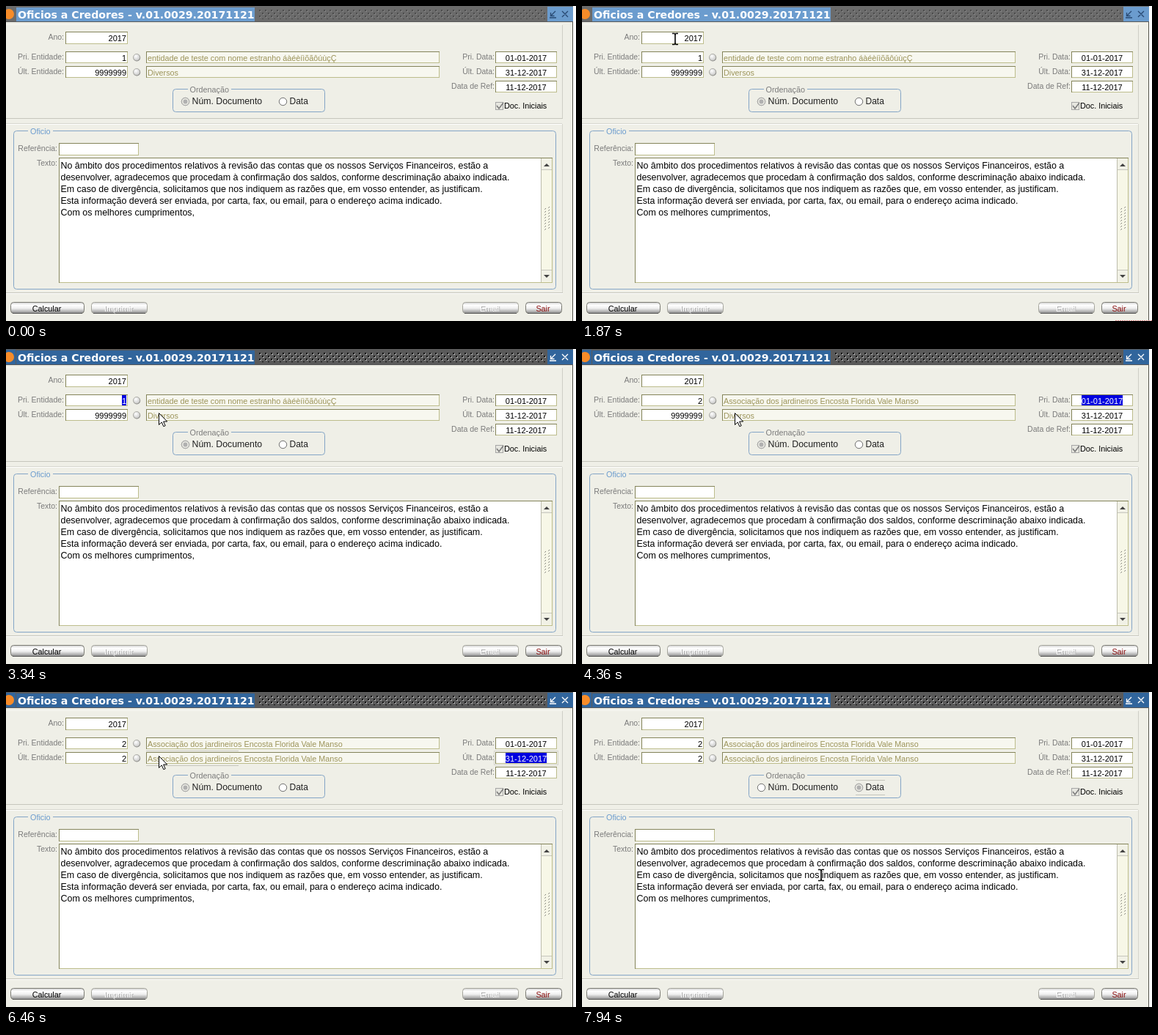
An HTML page that plays this animation: 777 px wide and 430 px high, repeating every 8000 ms.

```html
<!DOCTYPE html>
<html lang="pt">
<head>
<meta charset="utf-8">
<title>Oficios</title>
<style>
html, body { margin: 0; width: 777px; height: 430px; overflow: hidden; background: #efefe7; }
svg { display: block; font: 10.8px "Liberation Sans", Arial, sans-serif; }
rect, line, path.crisp { shape-rendering: crispEdges; }
text { white-space: pre; }
</style>
</head>
<body>
<svg id="stage" width="777" height="430" viewBox="0 0 777 430"></svg>
<script>
const LOOP = 8000;
const NAME = 'Associação dos jardineiros Encosta Florida Vale Manso';
const OLIVE = '#9c945a', GREY = '#7b7b7b', BLUE = '#0000e0';
const stage = document.getElementById('stage');

const rect = (x, y, w, h, fill, more = '') =>
  `<rect x="${x}" y="${y}" width="${w}" height="${h}" fill="${fill}" ${more}/>`;
const text = (x, y, s, fill = '#000', more = '') =>
  `<text x="${x}" y="${y}" fill="${fill}" ${more}>${s}</text>`;
const label = (x, y, s) => text(x, y, s, GREY, 'text-anchor="end" font-size="10.5"');
const hline = (x, y, w, c) => rect(x, y, w, 1, c);
const vline = (x, y, h, c) => rect(x, y, 1, h, c);

function field(x, y, w, h, fill = '#fff') {
  return rect(x, y, w, h, '#bdbd8c') + hline(x, y, w, '#84845a') +
    vline(x, y, h, '#84845a') + rect(x + 1, y + 1, w - 2, h - 2, fill);
}

function button(x, w, s, fill, off) {
  const mid = x + w / 2 - 1;
  const at = 'text-anchor="middle"';
  return `<rect x="${x + .5}" y="404.5" width="${w - 1}" height="15" rx="4" fill="url(#metal)" stroke="${off ? '#a5a59c' : '#7b7b73'}" style="shape-rendering:auto"/>` +
    `<path d="M${x + 3} 419.5h${w - 6}" stroke="#525252"/>` +
    (off ? text(mid + 1, 418, s, '#adadad', at) : '') + text(mid, 417, s, fill, at);
}

function group(x, y, w, h, s, from, to, fill) {
  return `<rect x="${x + .5}" y="${y + .5}" width="${w - 1}" height="${h - 1}" rx="4" fill="none" stroke="#84a5c6" style="shape-rendering:auto"/>` +
    rect(from - 3, y - 1, to - from + 6, 3, '#efefe7') + text(from, y + 5, s, fill);
}

const bead = y => `<circle cx="178.3" cy="${y + .5}" r="4.9" fill="#848484"/>` +
  `<circle cx="178" cy="${y}" r="4.5" fill="url(#bead)" stroke="#a5a59c" stroke-width=".7"/>`;

function radio(x, id) {
  return `<circle cx="${x}" cy="130.5" r="5.2" fill="#fff" stroke="#6b6b6b"/>` +
    `<g id="${id}"><circle cx="${x}" cy="130.5" r="5.2" fill="#e7e7e0" stroke="#a5a5a5"/>` +
    `<circle cx="${x}" cy="130.5" r="2.9" fill="#b0b0b0"/></g>`;
}

const letter = [
  'No âmbito dos procedimentos relativos à revisão das contas que os nossos Serviços Financeiros, estão a',
  'desenvolver, agradecemos que procedam à confirmação dos saldos, conforme descriminação abaixo indicada.',
  'Em caso de divergência, solicitamos que nos indiquem as razões que, em vosso entender, as justificam.',
  'Esta informação deverá ser enviada, por carta, fax, ou email, para o endereço acima indicado.',
  'Com os melhores cumprimentos,'
];

// Fields whose value can be selected: id, anchor, x, baseline
const values = [
  ['ano', 'end', 164, 48], ['first', 'end', 164, 75], ['last', 'end', 164, 94.5],
  ['from', 'middle', 709, 75], ['to', 'middle', 709, 94.5], ['ref', 'middle', 709, 114.5]
];

function scrollbar() {
  let s = rect(730, 208, 14, 169, '#f7f7e7') + vline(729, 208, 169, '#bdbdad');
  for (const [y, d] of [[208, 'M733 219h8l-4-4z'], [361, 'M733 367h8l-4 4z']])
    s += rect(730, y, 14, 15, '#f1f1e6') + hline(730, y ? y < 300 ? 223 : 360 : 0, 14, '#c6c6bd') +
      `<path d="${d}" fill="#424242"/>`;
  for (let i = 0; i < 8; i++)
    for (let j = 0; j < 2; j++) {
      const x = 734 + j * 5, y = 276 + i * 4 - j * 2;
      s += rect(x + 1, y, 1, 1, '#7b7b73') + rect(x, y + 1, 1, 1, '#a5a59c');
    }
  return s;
}

const dot = (x, y) => rect(x, y, 2, 2, '#101010') + rect(x + 2, y + 1, 1, 2, '#adadad') +
  rect(x + 1, y + 2, 1, 1, '#adadad');

stage.innerHTML = `<defs>
<linearGradient id="metal" x2="0" y2="1"><stop stop-color="#cecece"/><stop offset=".25" stop-color="#fff"/>
<stop offset=".55" stop-color="#efefef"/><stop offset="1" stop-color="#8c8c8c"/></linearGradient>
<radialGradient id="bead" cx=".4" cy=".35"><stop stop-color="#fff"/><stop offset="1" stop-color="#d6d6d6"/></radialGradient>
<pattern id="dots" x="345" y="5" width="8" height="8" patternUnits="userSpaceOnUse">${dot(0, 0) + dot(4, 4)}</pattern></defs>` +
  rect(0, 0, 777, 430, '#efefe7') +
  rect(0, 0, 773, 22, '#6b6b6b', 'id="bar"') +
  rect(0, 1, 13, 20, '#6b6b6b', 'id="corner"') +
  rect(14, 2, 325, 19, '#6b9cce', 'id="caption"') +
  rect(345, 5, 392, 13, 'url(#dots)', 'id="texture"') +
  rect(738, 1, 35, 20, '#6b9cce', 'id="tools"') +
  hline(0, 21, 773, '#5a5a5a') +
  '<circle cx="4" cy="11" r="7" fill="#f78c29"/>' +
  text(16, 17, 'Oficios a Credores - v.01.0029.20171121', '#fff',
    'font-family="DejaVu Sans, Verdana, sans-serif" font-weight="bold" font-size="14.15"') +
  '<g id="icons" fill="none" stroke-width="1.3"><path d="M749 7l-6 6M742.5 9v4.5h5M741 16h9M758 7l8 8M766 7l-8 8"/></g>' +
  rect(773, 0, 4, 430, '#fff') + vline(772, 22, 408, '#52524a') +
  hline(0, 25, 758, '#f7f7f2') + vline(758, 26, 127, '#ceceC6') + hline(0, 153, 759, '#c6c6bd') +
  hline(0, 160, 758, '#d6d6ce') + hline(0, 161, 758, '#fff') + vline(758, 161, 230, '#d6d6ce') +
  hline(0, 391, 759, '#c6c6bd') + hline(0, 392, 759, '#fff') +
  label(79, 46, 'Ano:') + label(79, 73, 'Pri. Entidade:') + label(79, 93, 'Últ. Entidade:') +
  label(666, 73, 'Pri. Data:') + label(666, 93, 'Últ. Data:') + label(666, 112.5, 'Data de Ref:') +
  label(70, 198, 'Referência:') + label(70, 218, 'Texto:') +
  rect(79.5, 33.5, 87, 19, 'none', 'id="focusAno" stroke="#d6d6ce"') +
  field(81, 35, 85, 17) + rect(82, 36, 83, 15, '#f7f7f7', 'id="tintAno"') +
  [62, 82].map(y => field(81, y, 85, 16) + field(191, y, 400, 16, '#f7f7ef') + bead(y + 8)).join('') +
  [62, 82, 102].map(y => field(667, y, 84, 16)).join('') +
  text(193, 75, '', OLIVE, 'id="name1"') + text(193, 95, '', OLIVE, 'id="name2"') +
  `<g id="glow">${hline(191, 80, 126, '#c6c6bd') + hline(191, 100, 126, '#c6c6bd')}</g>` +
  rect(665.5, 80.5, 87, 19, 'none', 'id="focusTo" stroke="#d6d6ce"') +
  values.map(([id, a, x, y]) => rect(0, y - 12, 0, 14, BLUE, `id="${id}Sel"`) +
    text(x, y, '', '#000', `id="${id}" text-anchor="${a}" font-size="11"`)).join('') +
  group(227, 113, 208, 32, 'Ordenação', 250.5, 304, GREY) +
  radio(244.5, 'byNum') + text(253.5, 134, 'Núm. Documento', '#212121', 'font-size="12.3"') +
  radio(377.5, 'byDate') + text(386.5, 134, 'Data', '#212121', 'font-size="12"') +
  `<g id="focusDate">${hline(373, 120, 40, '#c6c6bd') + hline(373, 140, 40, '#c6c6bd')}</g>` +
  rect(667.5, 131.5, 10, 10, '#e7e7e0', 'stroke="#a5a5a5"') +
  '<path d="M669 136l3 4 6-8" fill="none" stroke="#7b7b7b" stroke-width="1.5"/>' +
  text(679, 140, 'Doc. Iniciais') +
  group(10, 170, 740, 217, 'Oficio', 33, 61, '#6b9cce') +
  field(72, 187, 109, 17) + field(72, 207, 673, 171) + scrollbar() +
  letter.map((s, i) => text(74.5, 222 + i * 16, s, '#000', 'font-size="12.45"')).join('') +
  button(6, 101, 'Calcular', '#000') + button(116, 77, 'Imprimir', '#fff', true) +
  button(622, 77, 'Email', '#fff', true) + button(708, 50, 'Sair', '#8c1010') +
  '<path id="dash" class="crisp" d="M727 429.5h50" stroke="#d68484" stroke-dasharray="2 1"/>' +
  '<path id="arrow" d="M.5.5v16l3.7-3.6 2.6 5.8 2.4-1-2.6-5.7h5.1z" fill="#fff" stroke="#000"/>' +
  '<g id="beam"><path id="stem" d="M0-6V6" stroke="#000" stroke-width="1.6"/><path d="M-4-7.5h3L0-6 1-7.5h3M-4 7.5h3L0 6 1 7.5h3" fill="none" stroke="#000" stroke-width="1.3"/></g>';

const $ = {};
stage.querySelectorAll('[id]').forEach(e => $[e.id] = e);
const show = (e, on) => e.setAttribute('visibility', on ? 'visible' : 'hidden');
const paint = (e, c) => e.setAttribute('fill', c);

// Pointer moves: first step, last step, number of steps, end point
const moves = [
  [230, 540, 5, 215, 300], [1630, 1870, 4, 127, 45], [1950, 2420, 7, 147, 45],
  [3280, 3340, 2, 208, 87], [6760, 7070, 5, 363, 139], [7150, 7540, 6, 374, 131],
  [7770, 7940, 3, 326, 250]
];

function pointer(t) {
  let x = 262, y = 440;
  for (const [t0, t1, n, ex, ey] of moves) {
    if (t < t0) break;
    const step = Math.min(n, 1 + Math.floor((t - t0) / (t1 - t0) * (n - 1) + 1e-6));
    x += (ex - x) * step / n;
    y += (ey - y) * step / n;
  }
  return [Math.round(x), Math.round(y)];
}

const inside = (x, y, l, t, r, b) => x >= l && x < r && y >= t && y < b;

function setValue(id, s, selected) {
  const e = $[id], box = $[id + 'Sel'];
  e.textContent = s;
  paint(e, selected ? '#fff' : '#000');
  show(box, selected);
  if (selected) {
    const b = e.getBBox();
    box.setAttribute('x', Math.round(b.x));
    box.setAttribute('width', Math.round(b.width));
  }
}

function draw(t) {
  const active = t >= 2480, byDate = t >= 7390;
  const within = (a, b) => t >= a && t < b;
  paint($.bar, active ? '#5a5a5a' : '#6b6b6b');
  paint($.corner, active ? '#31659c' : '#6b6b6b');
  for (const e of [$.caption, $.tools]) paint(e, active ? '#31659c' : '#6b9cce');
  $.texture.setAttribute('opacity', active ? 1 : .35);
  $.icons.setAttribute('stroke', active ? '#fff' : '#294a73');
  show($.dash, within(1170, 2480));

  setValue('ano', '2017', false);
  setValue('first', t < 3810 ? '1' : '2', within(2800, 3810));
  setValue('last', t < 6000 ? '9999999' : '2', within(5140, 6000));
  setValue('from', '01-01-2017', within(4360, 5140));
  setValue('to', '31-12-2017', within(6460, 7390));
  setValue('ref', '11-12-2017', false);
  $.name1.textContent = t < 4280 ? 'entidade de teste com nome estranho áàéèíìõãôúùçÇ' : NAME;
  $.name2.textContent = t < 6460 ? 'Diversos' : NAME;

  show($.focusAno, within(2480, 2800));
  show($.tintAno, within(2480, 2800));
  show($.glow, within(6460, 6530));
  show($.focusTo, within(6460, 6530));
  show($.focusDate, byDate);
  show($.byNum, !byDate);
  show($.byDate, byDate);

  const [x, y] = pointer(t);
  const edit = inside(x, y, 72, 207, 729, 378) || inside(x, y, 81, 35, 166, 52);
  const seen = t >= 230;
  show($.arrow, seen && !edit);
  show($.beam, seen && edit);
  show($.stem, seen && edit && !within(2480, 3280));
  (edit ? $.beam : $.arrow).setAttribute('transform', `translate(${x} ${y})`);
}

function tick(now) {
  draw(now % LOOP);
  requestAnimationFrame(tick);
}
draw(0);
requestAnimationFrame(tick);
</script>
</body>
</html>
```
